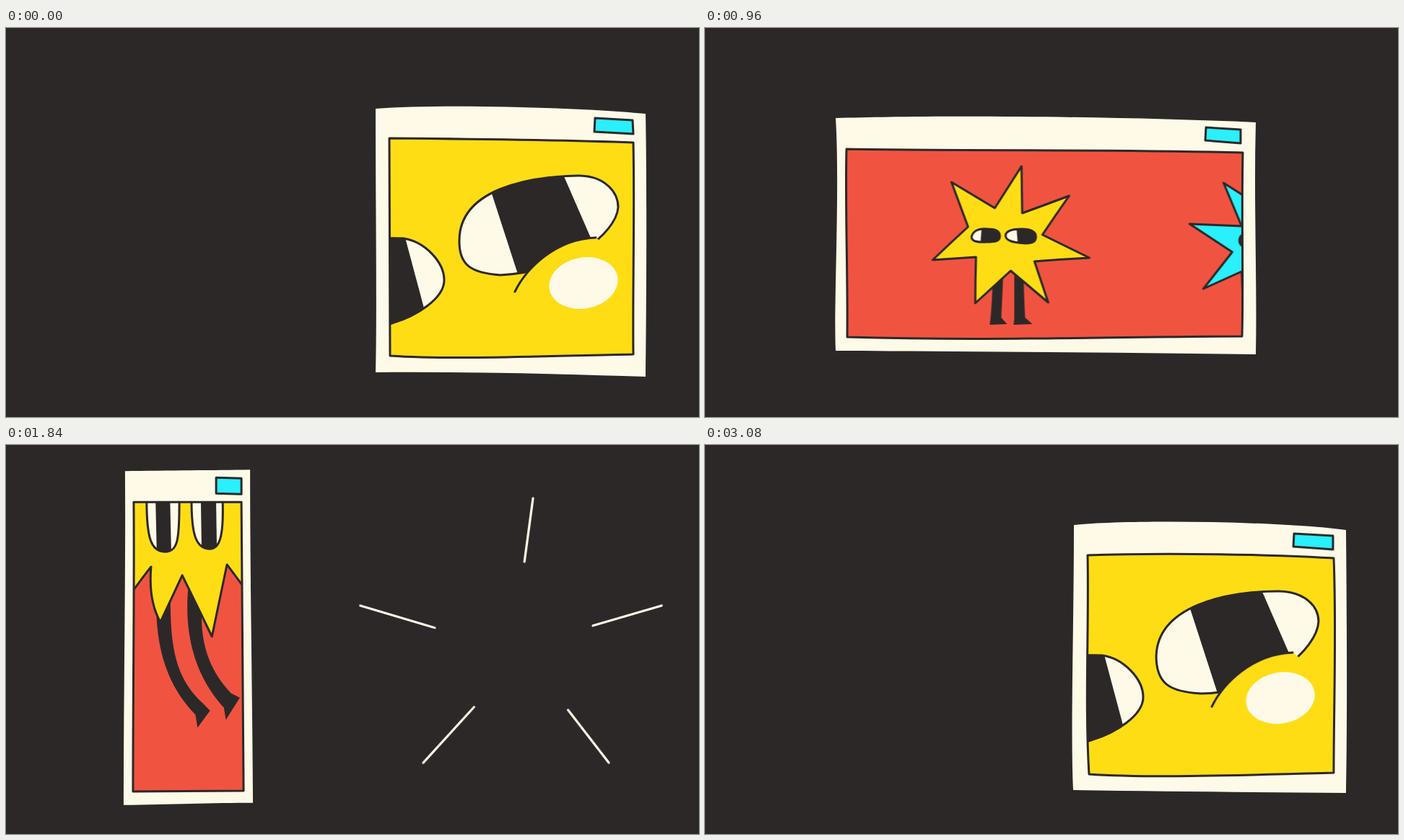
An HTML page without scripts for the animation above (3120 ms loop, 960 by 540 pixels).

```html
<!DOCTYPE html>
<html lang="en">
<head>
<meta charset="utf-8">
<title>Stretchy window</title>
<style>
html, body { margin: 0; width: 100%; height: 100%; overflow: hidden; background: #2d2828; }
svg { display: block; width: 100vw; height: 100vh; }
.a { animation: 3120ms linear infinite; }
.ink { stroke: #2d2828; stroke-width: 3; stroke-linejoin: round; stroke-linecap: round; }
.line { fill: none; stroke: #fffae8; stroke-width: 3.2; stroke-linecap: round; }
.dark { fill: #2d2828; }
.cream { fill: #fffae8; }
.yellow { fill: #ffdd15; }
.red { fill: #f05441; }
.cyan { fill: #29efff; }

/* window */
.outer { animation-name: outer; }
.inner { animation-name: inner; }
.button { animation-name: button; }
@keyframes outer {
  0%, 16.03%, 100% { d: path("M512,112 C600,105 790,110 886,119 Q886,119 886,119 C888,220 887,400 886,484 Q886,484 886,484 C760,480 640,477 512,478 Q512,478 512,478 C514,400 512,250 512,112 Q512,112 512,112Z") }
  20.51% { d: path("M262,138 C380,195 560,245 715,175 Q734,170 736,192 C740,250 739,330 732,400 Q730,420 708,416 C600,375 430,358 222,430 Q198,435 200,395 C200,320 207,240 212,165 Q216,127 262,138Z") }
  23.08% { d: path("M196,108 C330,104 600,107 748,112 Q748,112 748,112 C746,230 750,360 748,472 Q748,472 748,472 C600,468 330,470 196,468 Q196,468 196,468 C194,380 200,220 196,108 Q196,108 196,108Z") }
  26.5%, 51.92% { d: path("M181,125 C310,121 560,122 763,131 Q763,131 763,131 C760,240 765,350 763,453 Q763,453 763,453 C560,450 350,449 181,448 Q181,448 181,448 C178,390 187,220 181,125 Q181,125 181,125Z") }
  55.13% { d: path("M112,78 C200,190 400,225 540,195 Q560,190 562,215 C566,260 566,320 560,365 Q556,385 536,378 C400,345 200,390 115,488 Q100,500 98,465 C92,350 92,220 97,100 Q98,66 112,78Z") }
  58.97% { d: path("M165,36 C220,35 290,35 338,34 Q338,34 338,34 C338,180 341,340 342,497 Q342,497 342,497 C290,497 220,499 163,500 Q163,500 163,500 C163,340 166,180 165,36 Q165,36 165,36Z") }
  62.82%, 85.26% { d: path("M155,53 C190,47 290,53 352,58 Q352,58 352,58 C352,200 354,350 351,480 Q351,480 351,480 C300,484 220,485 154,485 Q154,485 154,485 C156,340 155,190 155,53 Q155,53 155,53Z") }
  88.46% { d: path("M358,183 C440,295 560,315 825,139 Q845,132 848,155 C855,260 863,380 858,440 Q853,469 824,460 C680,375 510,278 360,394 Q350,400 344,380 C328,330 328,260 344,195 Q348,172 358,183Z") }
  91.03% { d: path("M446,140 C560,165 750,130 895,105 Q905,103 905,115 C908,230 908,370 905,485 Q905,495 892,492 C750,470 560,445 446,455 Q440,455 439,445 C432,350 432,240 440,148 Q441,139 446,140Z") }
  92.95% { d: path("M528,93 C610,88 780,92 870,98 Q870,98 870,98 C872,220 871,390 870,500 Q870,500 870,500 C760,496 640,495 528,495 Q528,495 528,495 C529,400 527,240 528,93 Q528,93 528,93Z") }
  98.72% { d: path("M511,111 C590,103 800,106 888,118 Q888,118 888,118 C889,220 890,390 888,483 Q888,483 888,483 C760,482 640,481 510,479 Q510,479 510,479 C506,400 511,250 511,111 Q511,111 511,111Z") }
}
@keyframes inner {
  0%, 16.03%, 100% { d: path("M531,153 C640,154 790,156 869,159 Q869,159 869,159 C871,250 868,370 869,453 Q869,453 869,453 C760,455 620,461 532,455 Q532,455 532,455 C531,360 532,250 531,153 Q531,153 531,153Z") }
  20.51% { d: path("M265,183 C360,212 540,272 700,208 Q722,203 723,228 C727,300 724,350 718,388 Q716,406 698,401 C600,365 490,337 232,411 Q215,412 218,380 C218,330 224,250 230,205 Q234,180 265,183Z") }
  23.08% { d: path("M212,156 C380,158 560,155 731,158 Q731,158 731,158 C730,250 732,350 731,448 Q731,448 731,448 C570,446 400,452 212,448 Q212,448 212,448 C213,350 210,250 212,156 Q212,156 212,156Z") }
  26.5%, 51.92% { d: path("M196,168 C380,171 560,168 745,173 Q745,173 745,173 C743,260 746,350 744,428 Q744,428 744,428 C570,428 400,435 197,429 Q197,429 197,429 C198,340 194,250 196,168 Q196,168 196,168Z") }
  55.13% { d: path("M124,112 C210,215 400,250 530,222 Q545,220 546,235 C550,270 548,320 545,345 Q542,356 528,352 C400,325 210,365 128,452 Q117,462 115,435 C110,330 110,220 113,125 Q115,100 124,112Z") }
  58.97% { d: path("M177,79 C220,79 290,79 326,79 Q326,79 326,79 C327,200 329,340 329,480 Q329,480 329,480 C290,480 220,481 176,481 Q176,481 176,481 C176,340 178,200 177,79 Q177,79 177,79Z") }
  62.82%, 85.26% { d: path("M170,93 C220,93 290,95 338,98 Q338,98 338,98 C340,210 338,340 338,467 Q338,467 338,467 C290,465 230,470 170,469 Q170,469 170,469 C170,340 170,210 170,93 Q170,93 170,93Z") }
  88.46% { d: path("M368,209 C450,292 540,325 820,178 Q833,171 834,190 C836,270 848,380 846,425 Q845,452 818,446 C690,372 500,272 368,369 Q360,374 360,360 C345,300 350,260 356,212 Q359,200 368,209Z") }
  91.03% { d: path("M462,180 C570,200 750,170 880,150 Q888,149 888,158 C891,250 890,360 888,450 Q888,460 876,458 C750,440 570,420 464,428 Q458,428 457,420 C452,350 452,250 457,188 Q457,179 462,180Z") }
  92.95% { d: path("M547,138 C640,138 780,140 852,143 Q852,143 852,143 C854,250 851,370 852,470 Q852,470 852,470 C750,471 640,476 547,472 Q547,472 547,472 C546,360 548,250 547,138 Q547,138 547,138Z") }
  98.72% { d: path("M530,153 C640,149 790,152 871,157 Q871,157 871,157 C875,250 871,370 871,455 Q871,455 871,455 C760,458 620,463 532,457 Q532,457 532,457 C526,360 532,250 530,153 Q530,153 530,153Z") }
}
@keyframes button {
  0%, 16.03%, 100% { d: path("M816,125 868,128 869,147 815,144Z") }
  20.51% { d: path("M659,194 717,182 717,198 660,210Z") }
  23.08% { d: path("M683,122 729,124 729,144 682,142Z") }
  26.5%, 51.92% { d: path("M694,138 742,141 742,160 693,156Z") }
  55.13% { d: path("M490,206 540,196 540,206 491,217Z") }
  58.97% { d: path("M291,45 326,46 326,68 291,67Z") }
  62.82%, 85.26% { d: path("M303,65 339,67 339,86 303,85Z") }
  88.46% { d: path("M737,192 828,146 830,163 739,204Z") }
  91.03% { d: path("M822,127 884,115 885,135 823,147Z") }
  92.95% { d: path("M805,108 852,111 853,132 804,129Z") }
  98.72% { d: path("M816,123 870,126 870,145 815,141Z") }
}

/* yellow star */
.star { animation-name: star; }
@keyframes star {
  0%, 16.03%, 92.31%, 100% { d: path("M770,-300 L777,120 Q960,55 1150,-10 Q1040,145 930,300 L1330,500 Q1105,515 880,530 L990,850 L680,600 L390,860 Q395,675 400,490 Q215,500 30,510 Q180,375 330,240 L190,-120 L550,90Z") }
  20.51% { d: path("M530,195 L505,247 Q560,225 620,205 Q582,242 557,276 L668,321 Q610,340 547,346 L585,380 L467,338 L428,385 Q412,350 407,323 Q375,320 357,341 Q347,305 397,274 Q388,245 402,200 L443,249Z") }
  23.08%, 51.92% { d: path("M376,192 L377,257 Q410,245 442,233 Q423,260 405,287 L470,319 Q432,321 394,324 L413,381 L361,337 L312,382 Q312,350 313,318 Q283,320 253,322 Q277,299 302,276 L279,214 L339,250Z") }
  58.97% { d: path("M262,-100 L300,30 Q360,15 420,0 Q395,50 370,100 L350,225 Q328,193 306,165 Q306,165 306,165 L285,265 L244,180 L214,245 Q197,215 201,168 Q176,200 150,240 Q140,170 130,100 L110,-20 L215,20Z") }
  58.98% { d: path("M262,-100 L300,30 Q360,15 420,0 Q395,50 370,100 L350,225 Q328,195 306,165 L285,265 L244,180 L214,245 Q197,215 201,168 Q176,200 150,240 Q140,170 130,100 L110,-20 L215,20Z") }
  62.82%, 85.26% { d: path("M262,124 L295,215 Q358,190 420,165 Q390,205 360,245 L400,309 Q360,308 320,307 L326,370 L261,313 L193,363 Q195,332 197,300 Q153,323 110,345 Q130,288 150,230 L110,128 L226,205Z") }
  88.46% { d: path("M500,150 L650,190 Q705,185 755,180 Q732,230 706,257 L790,268 Q766,310 732,341 L815,450 L600,430 L400,450 Q365,425 330,400 Q305,375 280,350 Q300,315 320,280 L300,180 L420,190Z") }
}
.legL { animation-name: legL; }
.legR { animation-name: legR; }
@keyframes legL {
  0%, 16.03%, 92.31%, 100% { d: path("M530,620 C530,740 520,850 510,980 L505,1030 L650,1020 L600,970 C605,850 610,740 615,620Z") }
  20.51% { d: path("M464,340 C457,348 452,356 448,370 L440,390 L475,390 L470,370 C466,360 463,354 468,346Z") }
  23.08%, 51.92% { d: path("M336,335 C336,362 335,382 333,404 L332,412 L356,411 L348,402 C349,380 350,360 351,335Z") }
  58.97% { d: path("M208,220 C208,300 235,345 263,374 L266,392 L283,368 L271,356 C240,325 226,290 228,200Z") }
  62.82%, 85.26% { d: path("M225,335 C180,375 175,400 207,428 L193,438 L248,437 L225,420 C200,398 202,385 245,325Z") }
  88.46% { d: path("M500,430 C490,450 490,470 500,490 L490,500 L540,500 L530,490 C520,470 520,450 530,430Z") }
}
@keyframes legR {
  0%, 16.03%, 92.31%, 100% { d: path("M710,620 C710,740 710,850 710,980 L705,1030 L850,1020 L800,970 C800,850 800,740 800,620Z") }
  20.51% { d: path("M480,342 C487,350 494,358 502,372 L500,390 L535,390 L525,370 C515,360 505,352 495,345Z") }
  23.08%, 51.92% { d: path("M366,335 C366,362 366,382 366,404 L365,412 L391,411 L381,402 C380,380 379,360 379,335Z") }
  58.97% { d: path("M252,200 C245,285 275,335 302,364 L305,381 L324,350 L312,344 C284,315 269,280 271,230Z") }
  62.82%, 85.26% { d: path("M262,318 C306,372 327,390 282,420 L262,437 L315,435 L304,428 C335,400 330,370 270,318Z") }
  88.46% { d: path("M600,440 C590,460 590,480 600,500 L590,510 L640,510 L630,500 C620,480 620,460 630,440Z") }
}

/* yellow eyes */
.eyeL { animation-name: eyeL; }
.eyeR { animation-name: eyeR; }
.pupL { animation-name: pupL; }
.pupR { animation-name: pupR; }
@keyframes eyeL {
  0%, 16.03%, 92.31%, 100% { d: path("M440,360 C440,290 510,291 550,292 C580,296 607,325 607,350 C607,375 570,400 531,411 C480,425 440,415 440,360Z") }
  20.51% { d: path("M410,287 C410,278 422,276 437,275 C455,274 465,276 465,286 C465,295 458,297 446,297 C425,297 410,296 410,287Z") }
  23.08%, 51.92% { d: path("M307,289 C310,279 322,278 330,279 C341,279 346,283 346,289 C346,296 340,297 328,297 C314,298 306,296 307,289Z") }
  58.97% { d: path("M195,75 C195,40 200,20 217,20 C236,20 240,45 240,80 C240,130 238,147 220,147 C200,147 195,125 195,75Z") }
  62.82%, 85.26% { d: path("M179,257 C180,247 195,242 213,242 C240,241 248,248 248,257 C248,267 240,271 222,271 C195,272 179,268 179,257Z") }
  88.46% { d: path("M300,270 C300,235 350,250 408,272 C440,280 456,288 456,296 C456,304 445,304 430,302 C395,299 300,298 300,270Z") }
}
@keyframes eyeR {
  0%, 16.03%, 100% { d: path("M628,294 C629,225 720,206 795,205 C830,206 848,228 848,249 C845,285 780,338 685,343 C645,340 627,330 628,294Z") }
  20.51% { d: path("M479,288 C480,279 505,273 525,273 C540,272 549,276 548,288 C547,300 541,305 530,304 C510,303 479,300 479,288Z") }
  23.08%, 51.92% { d: path("M354,287 C356,280 366,279 376,279 C390,279 396,283 396,290 C396,297 390,299 382,299 C366,298 353,296 354,287Z") }
  58.97% { d: path("M257,75 C257,40 262,20 279,20 C296,20 301,45 300,80 C301,125 296,144 281,143 C262,142 257,120 257,75Z") }
  62.82%, 85.26% { d: path("M257,258 C259,248 275,242 295,242 C320,241 328,248 328,258 C327,268 318,272 300,272 C275,271 257,268 257,258Z") }
  88.46% { d: path("M488,299 C488,285 530,305 660,283 C685,280 697,290 697,307 C697,327 680,333 655,329 C580,314 488,318 488,299Z") }
  92.31%, 98.72% { d: path("M625,293 C627,224 720,203 795,203 C832,204 850,224 850,245 C848,283 780,344 688,345 C642,343 625,330 625,293Z") }
}
@keyframes pupL {
  0%, 16.03%, 92.31%, 100% { d: path("M430,250 542,250 590,430 430,430Z") }
  20.51% { d: path("M424,270 450,270 449,300 426,300Z") }
  23.08%, 51.92% { d: path("M321,276 350,276 350,300 319,300Z") }
  58.97% { d: path("M206,20 226,20 229,150 209,150Z") }
  62.82%, 85.26% { d: path("M197,235 231,235 231,275 197,275Z") }
  88.46% { d: path("M300,230 408,230 408,310 300,310Z") }
}
@keyframes pupR {
  0%, 16.03%, 92.31%, 100% { d: path("M660,190 766,190 840,360 715,360Z") }
  20.51% { d: path("M494,270 533,270 532,306 495,306Z") }
  23.08%, 51.92% { d: path("M369,276 400,276 400,302 371,302Z") }
  58.97% { d: path("M269,20 290,20 292,148 271,148Z") }
  62.82%, 85.26% { d: path("M276,235 308,235 306,275 275,275Z") }
  88.46% { d: path("M551,275 655,275 660,335 551,335Z") }
}
.cheek { animation-name: cheek; transform-origin: 640px 320px; }
@keyframes cheek {
  0%, 16.03%, 100% { transform: none }
  18.8%, 89.8% { transform: scale(0) }
  92.31%, 98.72% { transform: translate(-3px, -3px) }
}

/* entrances */
.yellowWalk { animation-name: yellowWalk; }
.blueWalk { animation-name: blueWalk; }
@keyframes yellowWalk {
  0%, 20.51% { transform: none }
  23.08%, 28.8% { transform: translateX(105px); animation-timing-function: ease-in-out }
  33.3%, 100% { transform: none }
}
@keyframes blueWalk {
  0%, 28.8% { transform: translateX(500px); animation-timing-function: ease-out }
  33.3%, 51.92% { transform: none }
  55.13%, 100% { transform: translateX(500px) }
}

/* accents */
.spark { fill: #fffae8; stroke: #fffae8; stroke-width: 3; stroke-linejoin: round; vector-effect: non-scaling-stroke; animation-name: spark; }
@keyframes spark {
  0%, 33.2% { transform: scale(0); opacity: 0 }
  33.3% { transform: scale(0); opacity: 1; animation-timing-function: ease-out }
  37.2%, 42.31% { transform: none; opacity: 1; animation-timing-function: ease-in-out }
  47.4% { transform: scale(1.35, .7); opacity: 1; animation-timing-function: ease-in }
  51.9% { transform: scale(0); opacity: 1 }
  52%, 100% { transform: scale(0); opacity: 0 }
}
.dash { stroke-dasharray: 1 3; }
.swirl { animation-name: swirl; }
@keyframes swirl {
  0%, 17.9% { stroke-dashoffset: 1; opacity: 0 }
  18% { stroke-dashoffset: 1; opacity: 1 }
  20.51% { stroke-dashoffset: 0; opacity: 1 }
  24.3% { stroke-dashoffset: -1; opacity: 1 }
  24.4%, 100% { stroke-dashoffset: -1; opacity: 0 }
}
.ray { animation-name: ray; }
@keyframes ray {
  0%, 55.1% { stroke-dashoffset: 1; opacity: 0 }
  55.2% { stroke-dashoffset: 1; opacity: 1 }
  58.97% { stroke-dashoffset: 0; opacity: 1 }
  62.8% { stroke-dashoffset: -1; opacity: 1 }
  62.9%, 100% { stroke-dashoffset: -1; opacity: 0 }
}
.burst { animation-name: burst; transform-origin: 703px 285px; }
@keyframes burst {
  0%, 55.13% { transform: scale(.75) }
  58.97% { transform: none }
  62.82%, 100% { transform: scale(1.07) }
}
</style>
</head>
<body>
<svg viewBox="0 0 960 540">
  <defs>
    <clipPath id="pane"><path class="a inner"/></clipPath>
    <clipPath id="inL"><path class="a eyeL"/></clipPath>
    <clipPath id="inR"><path class="a eyeR"/></clipPath>
    <path id="bL" d="M552,294 C553,285 562,284 572,284 C583,285 588,290 588,296 C588,304 582,306 574,306 C560,306 551,303 552,294Z"/>
    <path id="bR" d="M594,299 C595,290 602,288 612,288 C623,288 628,292 628,299 C627,307 621,311 611,310 C600,310 594,307 594,299Z"/>
    <clipPath id="inBL"><use href="#bL"/></clipPath>
    <clipPath id="inBR"><use href="#bR"/></clipPath>
  </defs>
  <rect width="960" height="540" class="dark"/>

  <path class="a outer cream"/>
  <g clip-path="url(#pane)">
    <rect width="960" height="540" class="red"/>
    <g class="a blueWalk">
      <path class="dark" d="M578,340 592,340 592,410 565,410 578,401Z M602,340 617,340 617,411 595,410 603,402Z"/>
      <path class="cyan ink" d="M626,196 630,261 693,248 641,292 689,338 623,336 635,394 596,344 558,392 555,338 502,362 542,311 483,272 555,275 530,215 588,252Z"/>
      <use href="#bL" class="cream"/>
      <path class="dark" clip-path="url(#inBL)" d="M545,280H573L575,310H545Z"/>
      <use href="#bL" class="ink" fill="none"/>
      <use href="#bR" class="cream"/>
      <path class="dark" clip-path="url(#inBR)" d="M590,285H614L611,313H590Z"/>
      <use href="#bR" class="ink" fill="none"/>
    </g>
    <g class="a yellowWalk">
      <path class="a legL dark"/>
      <path class="a legR dark"/>
      <path class="a star yellow ink"/>
      <path class="a eyeL cream"/>
      <g clip-path="url(#inL)"><path class="a pupL dark"/></g>
      <path class="a eyeL ink" fill="none"/>
      <path class="a eyeR cream"/>
      <g clip-path="url(#inR)"><path class="a pupR dark"/></g>
      <path class="a eyeR ink" fill="none"/>
      <g class="a cheek">
        <path class="yellow" d="M705,366 C720,335 760,293 817,291 L835,305 L835,400 L705,400Z"/>
        <path class="ink" fill="none" d="M705,366 C720,335 760,293 817,291"/>
        <ellipse class="cream" cx="800" cy="354" rx="48" ry="35.5" transform="rotate(-11 800 354)"/>
      </g>
    </g>
  </g>
  <path class="a inner ink" fill="none"/>
  <path class="a button cyan ink"/>

  <path class="a swirl dash line" pathLength="1" d="M667,148 C652,120 670,105 690,109 C725,115 770,165 767,188 C766,200 758,204 752,203"/>

  <g class="a burst">
    <path class="a ray dash line" pathLength="1" d="M718,163 730,74"/>
    <path class="a ray dash line" pathLength="1" d="M812,251 908,223"/>
    <path class="a ray dash line" pathLength="1" d="M778,367 835,441"/>
    <path class="a ray dash line" pathLength="1" d="M649,363 578,441"/>
    <path class="a ray dash line" pathLength="1" d="M595,254 491,223"/>
  </g>

  <g transform="translate(79 341)"><path class="a spark" d="M0,-32 Q2,-4 11,0 Q2,4 0,31 Q-2,4 -11,0 Q-2,-4 0,-32Z"/></g>
  <g transform="translate(131 366)"><path class="a spark" d="M0,-62 Q3,-8 16,0 Q3,8 0,55 Q-3,8 -16,0 Q-3,-8 0,-62Z"/></g>
  <g transform="translate(834 203)"><path class="a spark" d="M0,-35 Q5,-5 28,-1 Q5,5 1,41 Q-5,5 -33,1 Q-5,-5 0,-35Z"/></g>
  <g transform="translate(882 177)"><path class="a spark" d="M0,-23 Q4,-4 18,0 Q4,4 1,20 Q-4,4 -17,0 Q-4,-4 0,-23Z"/></g>
</svg>
</body>
</html>
```
